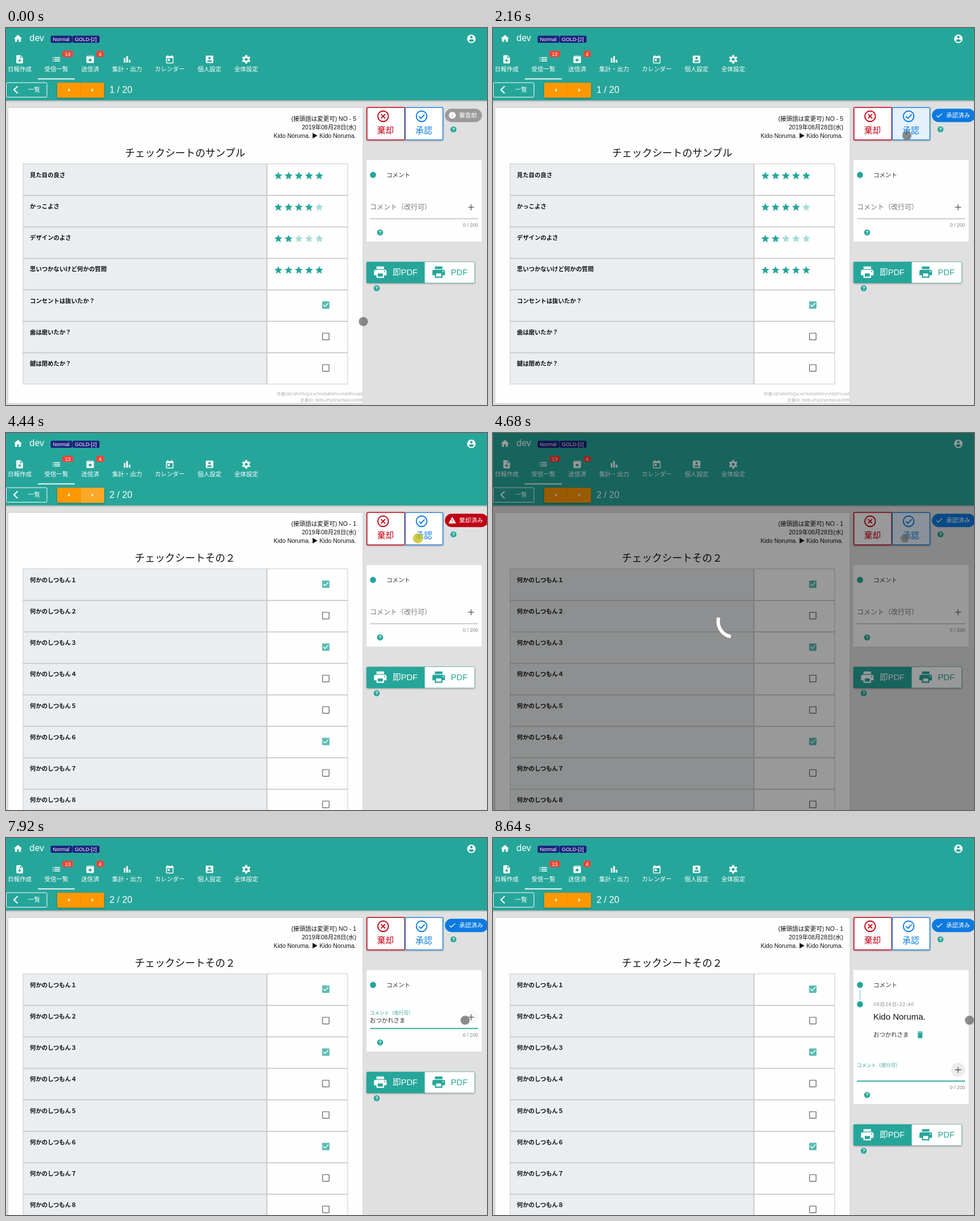
Animation of 846x662 px, one loop 9.6 s. Source, as an HTML page:

```html
<!DOCTYPE html>
<html lang="ja">
<head>
<meta charset="utf-8">
<style>
html, body { margin: 0; width: 100%; height: 100%; overflow: hidden; background: #e0e0e0; }
svg { display: block; width: 846px; height: 662px; font-family: "Liberation Sans", "Noto Sans CJK JP", "Noto Sans CJK", sans-serif; }
.raised { filter: drop-shadow(0 1.5px 1.5px rgba(0, 0, 0, .35)); }
</style>
</head>
<body>
<svg id="stage" viewBox="0 0 846 662"></svg>
<script>
const LOOP = 9600, STEP = 120;
const TEAL = '#26a69a', RED = '#c00014', BLUE = '#0b7ae0', WHITE = '#fff';
const PERSON = 'Kido Noruma.';
const REPLY = 'おつかれさま';
const CLICKS = [1920, 3000, 4440, 5520, 8040];

const ICONS = {
  home: 'M10 20v-6h4v6h5v-8h3L12 3 2 12h3v8z',
  user: 'M12 2a10 10 0 1 0 0 20a10 10 0 1 0 0-20zm0 3a3 3 0 1 1 0 6a3 3 0 1 1 0-6zm0 14.2c-2.5 0-4.7-1.3-6-3.2 0-2 4-3.1 6-3.1s6 1.1 6 3.1c-1.3 1.9-3.5 3.2-6 3.2z',
  note: 'M14 2H6a2 2 0 0 0-2 2v16a2 2 0 0 0 2 2h12a2 2 0 0 0 2-2V8zm2 14h-3v3h-2v-3H8v-2h3v-3h2v3h3zm-3-7V3.5L18.5 9z',
  list: 'M3 13h2v-2H3zm0 4h2v-2H3zm0-8h2V7H3zm4 4h14v-2H7zm0 4h14v-2H7zM7 7v2h14V7z',
  sent: 'M20.5 5.2l-1.4-1.7Q18.7 3 18 3H6q-.7 0-1.1.5L3.5 5.2Q3 5.8 3 6.5V19a2 2 0 0 0 2 2h14a2 2 0 0 0 2-2V6.5q0-.7-.5-1.3zM12 9.5l5.5 5.5H14v2h-4v-2H6.5zM5.1 5l.8-1h12l.9 1z',
  chart: 'M4 9h4v11H4zM16 13h4v7h-4zM10 4h4v16h-4z',
  date: 'M19 4h-1V2h-2v2H8V2H6v2H5a2 2 0 0 0-2 2v14a2 2 0 0 0 2 2h14a2 2 0 0 0 2-2V6a2 2 0 0 0-2-2zm0 16H5V9h14zM7 11h5v5H7z',
  person: 'M3 5v14a2 2 0 0 0 2 2h14a2 2 0 0 0 2-2V5a2 2 0 0 0-2-2H5a2 2 0 0 0-2 2zm9 1a3 3 0 1 1 0 6a3 3 0 1 1 0-6zm-6 11c0-2 4-3.1 6-3.1s6 1.1 6 3.1v1H6z',
  star: 'M12 17.3 18.2 21l-1.7-7L22 9.2l-7.2-.6L12 2 9.2 8.6 2 9.2 7.5 14l-1.7 7z',
  on: 'M19 3H5a2 2 0 0 0-2 2v14a2 2 0 0 0 2 2h14a2 2 0 0 0 2-2V5a2 2 0 0 0-2-2zm-9 14l-5-5 1.4-1.4 3.6 3.6 7.6-7.6L19 8z',
  off: 'M19 5v14H5V5h14m0-2H5a2 2 0 0 0-2 2v14a2 2 0 0 0 2 2h14a2 2 0 0 0 2-2V5a2 2 0 0 0-2-2z',
  print: 'M19 8H5a3 3 0 0 0-3 3v6h4v4h12v-4h4v-6a3 3 0 0 0-3-3zm-3 11H8v-5h8zm3-7a1 1 0 1 1 0-2a1 1 0 1 1 0 2zM18 3H6v4h12z',
  trash: 'M6 19a2 2 0 0 0 2 2h8a2 2 0 0 0 2-2V7H6zM19 4h-3.5l-1-1h-5l-1 1H5v2h14z',
  info: 'M12 2a10 10 0 1 0 0 20a10 10 0 1 0 0-20zm-1 5h2v2h-2zm0 4h2v6h-2z',
  check: 'M9 16.2 4.8 12l-1.4 1.4L9 19 21 7l-1.4-1.4z',
  warn: 'M1 21h22L12 2zm12-3h-2v-2h2zm0-4h-2v-4h2z'
};

const rect = (x, y, w, h, fill, more = '') =>
  `<rect x="${x}" y="${y}" width="${w}" height="${h}" fill="${fill}" ${more}/>`;
const circle = (x, y, r, fill, more = '') =>
  `<circle cx="${x}" cy="${y}" r="${r}" fill="${fill}" ${more}/>`;
const path = (d, stroke, width) =>
  `<path d="${d}" fill="none" stroke="${stroke}" stroke-width="${width}"/>`;
const text = (x, y, size, fill, str, more = '') =>
  `<text x="${x}" y="${y}" font-size="${size}" fill="${fill}" ${more}>${str}</text>`;
const icon = (name, x, y, size, fill) =>
  `<path d="${ICONS[name]}" fill="${fill}" fill-rule="evenodd" transform="translate(${x - size / 2} ${y - size / 2}) scale(${size / 24})"/>`;
const MID = 'text-anchor="middle"', END = 'text-anchor="end"', BOLD = 'font-weight="bold"';
const help = (x, y) => circle(x, y, 5.3, TEAL) + text(x, y + 3, 8.5, WHITE, '?', MID + BOLD);

function header(unread, page, nextLit) {
  const tabs = [[24, 'note', '日報作成'], [88.5, 'list', '受信一覧'], [148, 'sent', '送信済'], [213, 'chart', '集計・出力'],
    [288, 'date', 'カレンダー'], [358, 'person', '個人設定'], [422.5, '', '全体設定']];
  const badge = (x, w, n) => rect(x - w / 2, 40, w, 11, '#f44336', 'rx="3"') + text(x, 48.7, 9, WHITE, n, MID);
  const gear = path('M422.5 47.5v15M416 51.2l13 7.5M416 58.7l13-7.5', WHITE, 3.6) + circle(422.5, 55, 5.4, WHITE) + circle(422.5, 55, 2.6, TEAL);
  return rect(-5, 0, 856, 127, TEAL, 'class="raised"')
    + icon('home', 21, 18.5, 17.5, WHITE)
    + text(41, 23, 15.5, WHITE, 'dev', 'font-family="Noto Sans, sans-serif"')
    + rect(78.5, 13.5, 38, 12.5, '#1a237e', 'rx="2.5"') + rect(117, 13.5, 47.5, 12.5, '#1a237e', 'rx="2.5"')
    + text(82.5, 23, 9, WHITE, 'Normal') + text(121, 23, 9, WHITE, 'GOLD-[2]')
    + icon('user', 818.5, 19, 18, WHITE)
    + tabs.map(([x, name, label]) => (name ? icon(name, x, 55, 17.5, WHITE) : gear) + text(x, 76, 10.5, WHITE, label, MID)).join('')
    + badge(108.5, 19, unread) + badge(165.5, 13, 4)
    + rect(56, 88.5, 65, 1.8, WHITE)
    + rect(.5, 96, 71.5, 25.5, 'none', 'rx="2" stroke="#fff"')
    + path('M20.5 102.2l-6.5 6.3 6.5 6.3', WHITE, 2)
    + text(39, 112, 10.5, WHITE, '一覧')
    + `<g class="raised">${rect(90, 96, 82.5, 26.5, '#ff9800', 'rx="2"')}${nextLit ? rect(131, 96, 41.5, 26.5, '#ffa726') : ''}</g>`
    + rect(130.3, 96, .8, 26.5, '#e08a10')
    + '<path d="M112 106v6l-3.5-3zM150.5 106v6l3.5-3z" fill="#fff"/>'
    + text(182, 114, 16, WHITE, page + ' / 20');
}

function sheet(page) {
  const first = page === 1;
  const rows = first
    ? [['見た目の良さ', 5], ['かっこよさ', 4], ['デザインのよさ', 2], ['思いつかないけど何かの質問', 5],
      ['コンセントは抜いたか？', true], ['歯は磨いたか？', false], ['鍵は閉めたか？', false]]
    : [...'１２３４５６７８'].map((n, i) => ['何かのしつもん' + n, [0, 2, 5].includes(i)]);
  const stars = (n, y) => [0, 1, 2, 3, 4].map(i => icon('star', 479 + 18 * i, y + 20.6, 16.8, i < n ? TEAL : '#a8dbd7')).join('');
  const box = (on, y) => icon(on ? 'on' : 'off', 562.5, y + 26.6, 17.3, on ? '#5cbcb3' : '#757575');
  const height = first ? 520 : 540;
  let out = rect(3.5, 139.5, 624.5, height, '#fefefe', 'stroke="#cbcbcb"')
    + text(616, 163, 10.5, '#111', `(接頭語は変更可) NO - ${first ? 5 : 1}`, END)
    + text(616, 178, 10.5, '#111', '2019年08月28日(水)', END)
    + text(615.5, 193, 10.5, '#111', `${PERSON} ▶ ${PERSON}`, END)
    + text(315, 226, 17.7, '#111', first ? 'チェックシートのサンプル' : 'チェックシートその２', MID);
  rows.forEach(([label, value], i) => {
    const y = 238.8 + 55.25 * i;
    out += rect(30, y, 428.5, 55.25, '#ebeef0')
      + rect(29.5, y - .9, 571.5, i ? 1.8 : 1, '#cacaca')
      + text(42, y + 22.7, 10.4, '#111', label, BOLD)
      + (typeof value === 'number' ? stars(value, y) : box(value, y));
  });
  const end = rows.length * 55.25;
  out += rect(29.5, 238.5, 1, end, '#cacaca') + rect(457.8, 238.5, 2, end, '#cacaca') + rect(600.5, 238.5, 1, end, '#cacaca');
  if (first) out += rect(29.5, 624.7, 572, 1, '#cacaca')
    + text(627.5, 645, 7.3, '#aaa', '作者UID:kR4TbQzLw7XsGd0NfYcVh82PmJa5', END)
    + text(627.5, 656, 7.3, '#aaa', '文書ID: tW6LxPq3ZsKfNaVdJ05R', END);
  return out;
}

function review(status, hover) {
  const [color, name, label, width] = {
    wait: ['#9a9a9a', 'info', '審査前', 65],
    ok: [BLUE, 'check', '承認済み', 76],
    no: [RED, 'warn', '棄却済み', 76]
  }[status];
  return `<g class="raised">${rect(634, 139, 135, 58, WHITE, 'rx="2"')}</g>`
    + (hover ? rect(702, 140, 66, 56, '#e5f1fc') : '')
    + rect(634.8, 139.6, 66.5, 56.8, 'none', `rx="1.5" stroke="${RED}" stroke-width="1.5"`)
    + rect(702.2, 139.6, 66.2, 56.8, 'none', `rx="1.5" stroke="${BLUE}" stroke-width="1.3"`)
    + circle(663.3, 155, 9.3, 'none', `stroke="${RED}" stroke-width="1.9"`)
    + path('M659.7 151.4l7.2 7.2m0-7.2l-7.2 7.2', RED, 1.9)
    + circle(731, 155, 9.3, 'none', `stroke="${BLUE}" stroke-width="1.9"`)
    + path('M726.3 155.2l3.4 3.4 6.6-6.8', BLUE, 1.9)
    + text(667.5, 185.3, 14.7, RED, '棄却', MID) + text(735, 185.3, 14.7, BLUE, '承認', MID)
    + rect(772, 141.7, width, 23.6, color, 'rx="11.8"')
    + icon(name, 785, 153.3, 14.5, WHITE) + text(797, 157.2, 10.5, WHITE, label)
    + help(787, 178);
}

function comments(s) {
  const accent = s.focus ? TEAL : '#777';
  const label = s.focus ? [640, 310, 8.5] : [640, 318.5, 12];
  const posted = circle(645.5, 292, 5.4, TEAL) + rect(645, 268, 1.2, 15.5, '#7cc8c1')
    + text(669, 294.7, 8.5, '#888', '08月28日-22:40', 'letter-spacing="1"')
    + text(669, 319, 15, '#111', PERSON)
    + text(669, 348.5, 10.4, '#333', REPLY) + icon('trash', 751.3, 345.5, 16, TEAL);
  return rect(634, 232, 202.5, s.posted ? 235 : 143, '#fefefe')
    + circle(645.5, 258, 5.4, TEAL) + text(669, 261.5, 10.5, '#333', 'コメント')
    + (s.posted ? posted : '')
    + `<g transform="translate(0 ${s.posted ? 92.3 : 0})">`
    + text(...label, accent, 'コメント（改行可）')
    + text(640, 324, 10.4, '#333', REPLY.slice(0, s.typed))
    + (s.caret ? rect(640, 315, 1, 12, '#222') : '')
    + circle(818, 314.7, 12.5, '#000', `opacity="${s.plus}"`)
    + path('M812.7 314.7h10.6M818 309.4v10.6', '#555', 1.3)
    + (s.focus ? rect(640, 333.6, 190.5, 1.8, TEAL) : rect(640, 334.5, 190.5, .9, '#949494'))
    + text(830.5, 348.5, 8.8, '#858585', s.typed + ' / 200', END)
    + help(658, 359)
    + `<g class="raised">${rect(634, 410.5, 190.5, 37.5, TEAL, 'rx="2"')}</g>`
    + rect(736.5, 411, 87.5, 36.5, WHITE, 'rx="1.5"')
    + icon('print', 658.3, 428.8, 26.5, WHITE) + text(680, 434.2, 14.7, WHITE, '即PDF')
    + icon('print', 761, 428.8, 26.5, TEAL) + text(782.5, 434.2, 14.7, TEAL, 'PDF')
    + help(652, 457) + '</g>';
}

// Each move: start, end, then start, control and end points of a quadratic curve.
const MOVES = [
  [480, 1560, 628.5, 515.5, 572, 330, 728, 189],
  [2160, 2880, 728, 189, 460, 190, 163, 108],
  [3600, 4200, 163, 108, 450, 221, 724.5, 185],
  [4800, 5400, 724.5, 185, 740, 230, 746.5, 283],
  [7200, 7800, 746.5, 283, 780, 296, 807.5, 320]
];

function pointer(t) {
  if (t >= 8640) return [838, 320];
  const [a, b, x0, y0, cx, cy, x1, y1] = MOVES.filter(m => t >= m[0]).pop() || MOVES[0];
  const u = Math.max(0, Math.min(1, (t - a) / (b - a)));
  const e = u * u * (3 - 2 * u);
  const curve = (p, c, q) => p * (1 - e) ** 2 + 2 * c * e * (1 - e) + q * e * e;
  return [curve(x0, cx, x1), curve(y0, cy, y1)];
}

function dimming(t) {
  const levels = { 2040: .4, 4560: .2, 4680: .4, 4800: .2, 8160: .4 };
  return levels[t] || 0;
}

function loader(t) {
  const level = dimming(t);
  if (!level) return '';
  const turn = 100 + (t - 4680) * 360 / 1400;
  return rect(0, 0, 846, 662, '#000', `opacity="${level}"`)
    + circle(423, 331, 27, 'none', `stroke="#fff" stroke-width="6" pathLength="360" stroke-dasharray="95 265" transform="rotate(${turn} 423 331)"`);
}

function draw(t) {
  const within = (a, b) => t >= a && t < b;
  const page = t < 3240 ? 1 : 2;
  const status = t < 2040 ? 'wait' : within(3240, 4680) ? 'no' : 'ok';
  const posted = t >= 8280;
  const typed = t < 6120 || posted ? 0 : Math.min(6, Math.floor((t - 6120) / STEP) + 1);
  const [x, y] = pointer(t);
  const clicked = CLICKS.includes(t);
  return sheet(page)
    + header(t < 2040 ? 14 : 13, page, within(2880, 4560))
    + review(status, within(2040, 2400) || within(4560, 5400))
    + comments({
      posted, typed, focus: t >= 5520, caret: within(5880, 6120),
      plus: t < 7800 ? 0 : t < 8040 ? .02 : .07
    })
    + loader(t)
    + circle(x, y, clicked ? 8.5 : 7.6, clicked ? '#c9bf1c' : '#606060',
      `fill-opacity="${clicked ? .8 : .72}" stroke="${clicked ? '#d8d060' : '#808080'}" stroke-opacity=".5" stroke-width="1.5"`);
}

const stage = document.getElementById('stage');
const start = performance.now();
let shown = -1;
function tick() {
  const t = Math.floor((performance.now() - start) % LOOP / STEP) * STEP;
  if (t !== shown) stage.innerHTML = draw(shown = t);
  requestAnimationFrame(tick);
}
tick();
</script>
</body>
</html>
```
